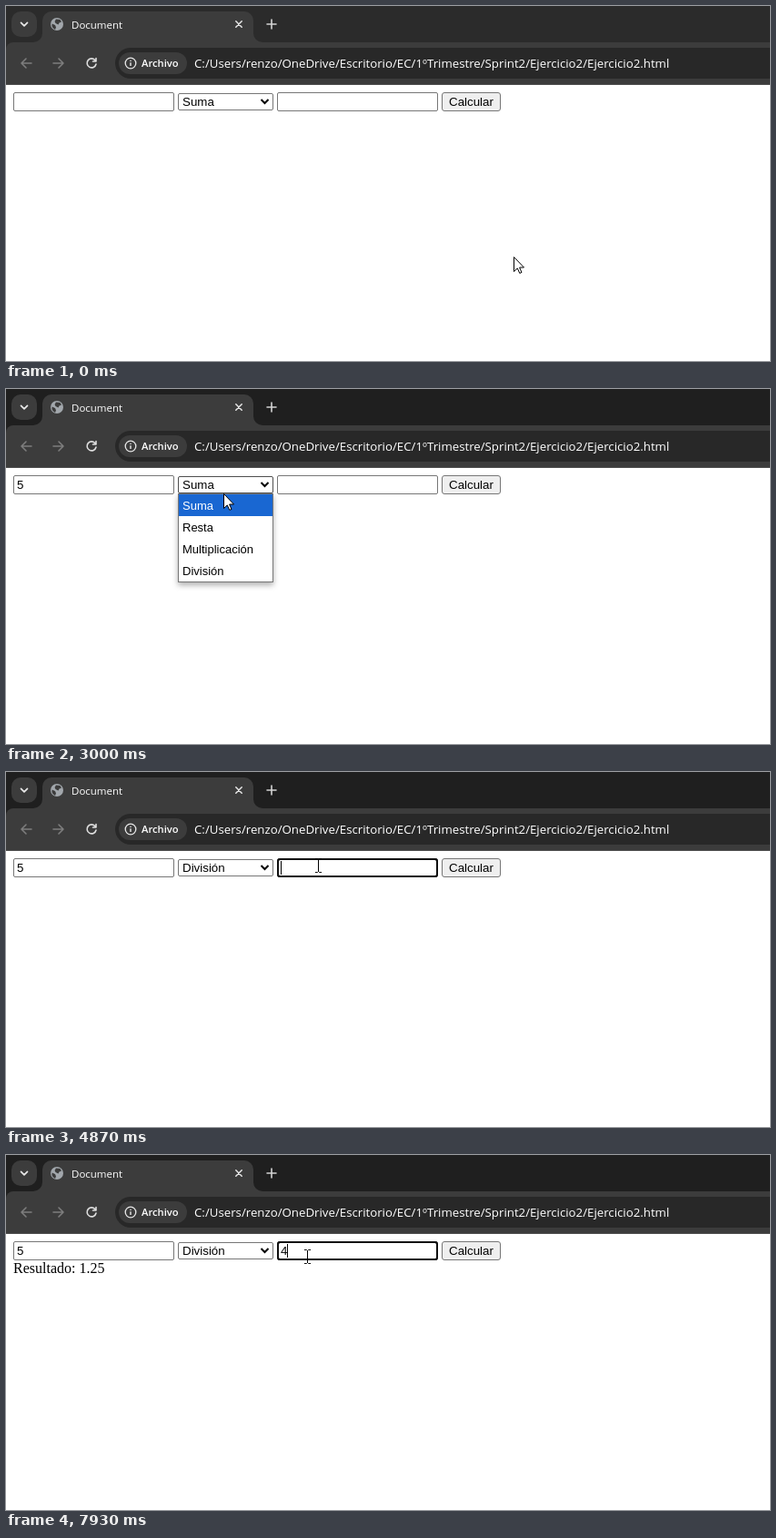
Animation of 840 by 391 pixels, one loop 8000 ms. Source, as an HTML page:

```html
<!DOCTYPE html>
<html lang="es">
<head>
<meta charset="utf-8">
<title>Document</title>
<style>
  html, body { margin: 0; width: 100%; height: 100%; overflow: hidden; background: #fff; }
  svg { display: block; }
  text { white-space: pre; }
  .ui { font-family: "Open Sans", "Noto Sans", sans-serif; fill: #fff; }
  .form { font: 13.333px "Liberation Sans", Arial, sans-serif; }
  .serif { font: 16px "Liberation Serif", "Times New Roman", serif; }
  .line { fill: none; stroke-linecap: round; stroke-linejoin: round; }
  #popup { filter: drop-shadow(0 3px 3px rgba(0, 0, 0, .32)); }
  #popup text { font-size: 13px; }
</style>
</head>
<body>
<svg width="840" height="391">
  <rect width="840" height="391" fill="#fff"/>

  <!-- tab strip -->
  <rect id="strip" width="840" height="60"/>
  <path d="M0 87V48a8 8 0 0 1 8-8H840V87Z" fill="#3c3c3c"/>
  <path d="M30 40a10 10 0 0 0 10-10V16a10 10 0 0 1 10-10H262a10 10 0 0 1 10 10V30a10 10 0 0 0 10 10Z" fill="#3c3c3c"/>
  <rect x="6" y="6" width="28" height="28" rx="10" fill="#3c3c3c"/>
  <path class="line" d="M16.5 18.3l3.5 3.5l3.5-3.5" stroke="#e8e8e8" stroke-width="1.7"/>
  <circle cx="56" cy="20" r="7" fill="#a2a7ac"/>
  <path d="M50.5 19.5l3.5 1.5l1 2.5l-1 2.5q-4-2-3.5-6.5ZM55 14.5l4.500 .5l1.500 2.500l-2.500 1l-1 2l-3-1.500l-1-2Z" fill="#3c3c3c"/>
  <text class="ui" x="72" y="25" font-size="11.5">Document</text>
  <path class="line" d="M252.8 16.8l6.400 6.400m0-6.400l-6.400 6.400" stroke="#e8e8e8" stroke-width="1.5"/>
  <path class="line" d="M287 20h10m-5-5v10" stroke="#d4d4d4" stroke-width="1.6"/>

  <!-- toolbar -->
  <g class="line" stroke="#7d7d7d" stroke-width="1.6">
    <path d="M28 63H17m5-5l-5 5l5 5"/>
    <path d="M52 63H63m-5-5l5 5l-5 5"/>
    <path d="M98.2 60A5 5 0 1 0 99 64M99 57.5V61H95.5" stroke="#dedede"/>
  </g>
  <rect x="120" y="46" width="760" height="34" rx="17" fill="#282828"/>
  <rect x="124" y="51" width="75" height="24" rx="12" fill="#3c3c3c"/>
  <circle cx="137" cy="63" r="5.8" fill="none" stroke="#e8e8e8" stroke-width="1.3"/>
  <path d="M137 62.3v3.7M137 59.7v1.4" stroke="#e8e8e8" stroke-width="1.4"/>
  <text class="ui" x="149" y="67" font-size="11.2" font-weight="600">Archivo</text>
  <text class="ui" x="207" y="68" font-size="13.25">C:/Users/renzo/OneDrive/Escritorio/EC/1ºTrimestre/Sprint2/Ejercicio2/Ejercicio2.html</text>
  <rect y="86" width="840" height="1" fill="#4f4f4f"/>

  <!-- page -->
  <g class="form">
    <rect id="box1" x="8.5" y="95.5" width="176" height="20" rx="1.5"/>
    <text id="val1" x="12" y="110">5</text>
    <rect id="select" x="189.5" y="96.5" width="104" height="18" rx="1.5"/>
    <text id="choice" x="194" y="110"></text>
    <path d="M280.5 103l4 4l4-4" fill="none" stroke="#000" stroke-width="2"/>
    <rect id="box2" x="298.5" y="95.5" width="176" height="20" rx="1.5"/>
    <text id="val2" x="302" y="110">4</text>
    <rect id="button" x="479.5" y="95.5" width="64" height="20" rx="2.5"/>
    <text x="487" y="110">Calcular</text>
    <rect id="ring" y="96" width="175" height="19" rx="2.5" fill="none" stroke="#101010" stroke-width="2"/>
    <rect id="caret" y="98" width="1" height="15"/>
    <g id="popup">
      <rect x="189.5" y="115.5" width="104" height="97" fill="#fff" stroke="#767676"/>
      <rect id="mark" x="190" width="103" height="24" fill="#1967d2"/>
    </g>
  </g>
  <text id="result" class="serif" x="8" y="130">Resultado: 1.25</text>

  <path id="arrow" d="M.5 .5V16.5L4.3 12.9L6.8 18.4L9 17.4L6.6 12H11.5Z" fill="#fff" stroke="#000"/>
  <path id="beam" d="M-3-7.5h2.500l1 1l1-1H4M.5-7V7M-3 7.500h2.500l1-1l1 1H4" fill="none" stroke="#000"/>
</svg>
<script>
const LOOP = 8000, FPS = 15, BLINK = 8;
const $ = id => document.getElementById(id);
const show = (id, on) => { $(id).style.display = on ? "" : "none"; };
const set = (id, name, value) => $(id).setAttribute(name, value);
const options = ["Suma", "Resta", "Multiplicación", "División"];

// what happens when, in ticks of 1/15 s
const at = { focus1: 16, type1: 31, open: 45, pick: 57, focus2: 66, type2: 80, press: 94, result: 95, refocus: 119 };

// pointer moves: ticks, end point, ease-out power, sag of the path
const home = { x: 558, y: 276 };
const moves = [
  { from: 0, to: 12, x: 100, y: 105, ease: 1.5 },
  { from: 33, to: 41, x: 239, y: 102, ease: 2.4 },
  { from: 44, to: 51, x: 239, y: 192, ease: 1 },
  { from: 56, to: 63, x: 343, y: 103, ease: 1.5 },
  { from: 79, to: 91, x: 497, y: 102, ease: 1.5, sag: 19 },
  { from: 99, to: 108, x: 246, y: 103, ease: 2.1 },
  { from: 112, to: 116, x: 331, y: 112, ease: 1.5 }
];

const labels = options.map((name, i) => {
  const el = document.createElementNS("http://www.w3.org/2000/svg", "text");
  el.setAttribute("x", 194);
  el.setAttribute("y", 133 + 24 * i);
  el.textContent = name;
  $("popup").append(el);
  return el;
});

function pointer(tick) {
  let { x, y } = home;
  for (const m of moves) {
    if (tick <= m.from) break;
    const k = 1 - (1 - Math.min(1, (tick - m.from) / (m.to - m.from))) ** m.ease;
    x += (m.x - x) * k;
    y += (m.y - y) * k + (m.sag || 0) * Math.sin(Math.PI * k);
  }
  return [Math.round(x), Math.round(y)];
}

function draw(tick) {
  const since = name => tick >= at[name];
  const [x, y] = pointer(tick);
  const open = since("open") && !since("pick");
  const hit = (left, right, top = 95, bottom = 116) =>
    !open && x >= left && x < right && y >= top && y < bottom;
  const over = {
    box1: hit(8, 185),
    select: open || hit(189, 294, 96, 115),
    box2: hit(298, 475),
    button: hit(479, 544)
  };
  for (const id in over) {
    set(id, "stroke", over[id] ? "#4f4f4f" : "#767676");
    set(id, "fill", "#fff");
  }
  set("button", "fill", tick === at.press ? "#f5f5f5" : over.button ? "#e5e5e5" : "#efefef");

  // the window is inactive until the first click
  set("strip", "fill", since("focus1") ? "#1f1f1f" : "#2b2b2b");

  const first = since("focus1") && !since("open");
  const second = since("focus2") && !since("press") || since("refocus");
  const filled = since(first ? "type1" : "type2");
  const restarts = [at.focus1, at.type1, at.focus2, at.type2, at.refocus];
  const age = tick - restarts.filter(s => s <= tick).pop();
  show("ring", first || second);
  show("caret", (first || second) && age % (2 * BLINK) < BLINK);
  set("ring", "x", first ? 9 : 299);
  set("caret", "x", (first ? 12 : 302) + (filled ? 7 : 0));

  show("val1", since("type1"));
  show("val2", since("type2"));
  show("result", since("result"));
  $("choice").textContent = options[since("pick") ? 3 : 0];

  show("popup", open);
  if (open) {
    // the highlight trails the pointer by one tick
    const row = Math.min(3, Math.max(0, Math.floor((pointer(tick - 1)[1] - 116) / 24)));
    set("mark", "y", 116 + 24 * row);
    labels.forEach((el, i) => el.setAttribute("fill", i === row ? "#fff" : "#000"));
  }

  const text = over.box1 || over.box2;
  show("arrow", !text);
  show("beam", text);
  set(text ? "beam" : "arrow", "transform", `translate(${x} ${y})`);
}

function frame() {
  const t = performance.now() % LOOP;
  draw(Math.floor(t * FPS / 1000 + 0.1) % (LOOP * FPS / 1000));
  requestAnimationFrame(frame);
}
frame();
</script>
</body>
</html>
```
